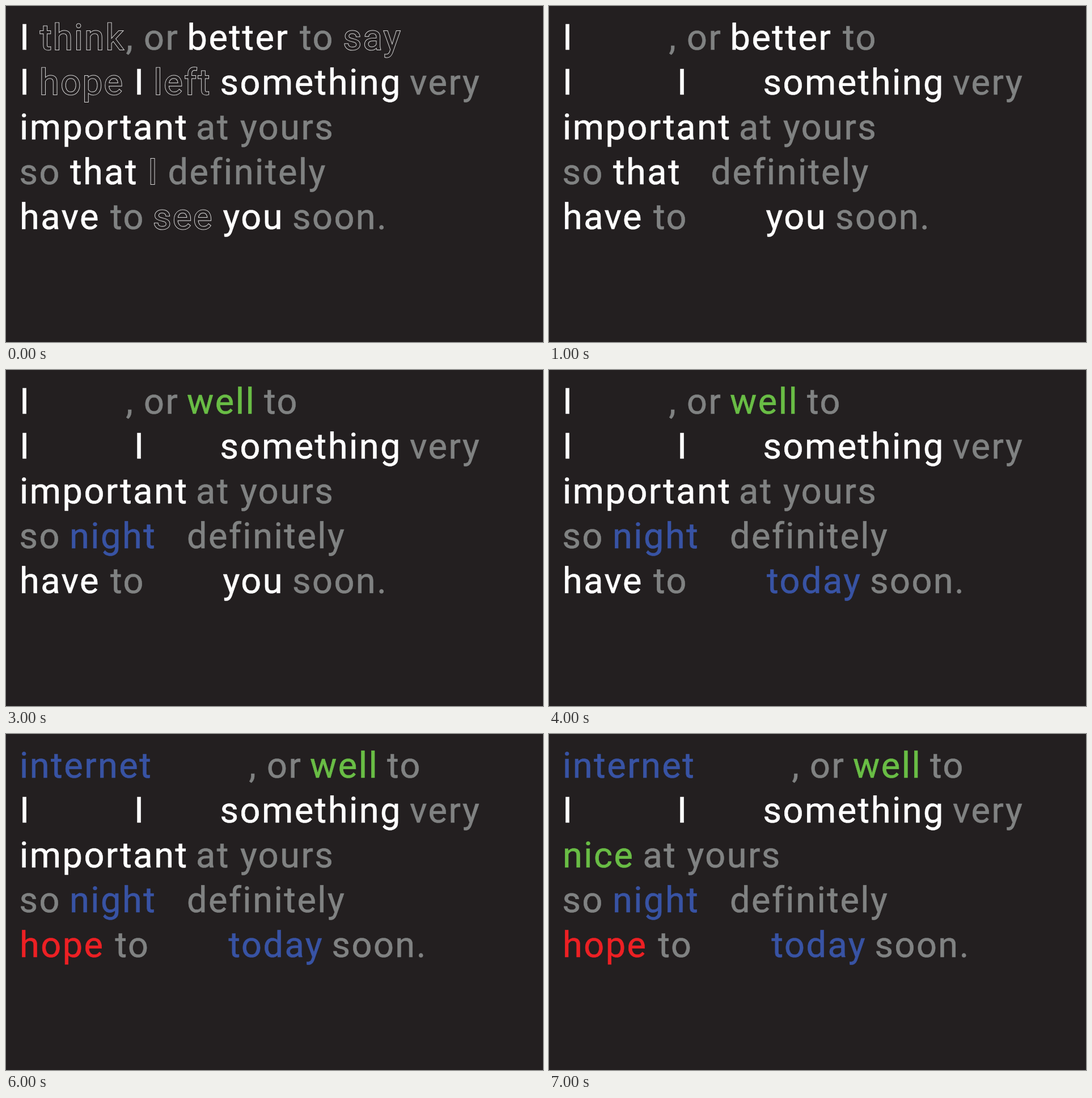
An HTML page that plays this animation: 947 by 592 pixels, repeating every 8 s.

```html
<!DOCTYPE html>
<html lang="en">
<head>
<meta charset="utf-8">
<title>Letter</title>
<style>
  html, body { margin: 0; width: 100%; height: 100%; overflow: hidden; background: #231f20; }
  svg { display: block; width: 947px; height: 592px; }
  text {
    font: 400 63px Roboto, "Liberation Sans", sans-serif;
    letter-spacing: 2.5px;
    fill: var(--ink);
    stroke: var(--ink);
    stroke-width: .6px;
  }
  .white { --ink: #fff; }
  .gray { --ink: #808282; }
  .green { --ink: #69bd45; }
  .blue { --ink: #3853a4; }
  .red { --ink: #ed2024; }
  .outline { fill: #231f20; stroke: #d8d8d8; stroke-width: 2px; paint-order: stroke; }
</style>
</head>
<body>
<svg viewBox="0 0 947 592"></svg>
<script>
const LOOP = 8000, FIRST = 77, PITCH = 79;

// One list per line: [x, text, style, first second, last second, ...[second, shift]]
const lines = [
  [
    [24, 'I', 'white', 0, 6],
    [24, 'internet', 'blue', 6, 8],
    [60, 'think', 'outline', 0, 1],
    [211.5, ',', 'gray', 0, 8, [6, 217]],
    [243, 'or', 'gray', 0, 8, [6, 217]],
    [319.5, 'better', 'white', 0, 2],
    [319, 'well', 'green', 2, 8, [6, 217]],
    [518, 'to', 'gray', 0, 8, [2, -63], [6, 217]],
    [594.5, 'say', 'outline', 0, 1]
  ],
  [
    [24, 'I', 'white', 0, 8],
    [59, 'hope', 'outline', 0, 1],
    [226, 'I', 'white', 0, 8],
    [260.5, 'left', 'outline', 0, 1],
    [377.5, 'something', 'white', 0, 8],
    [712, 'very', 'gray', 0, 8]
  ],
  [
    [24, 'important', 'white', 0, 7],
    [24, 'nice', 'green', 7, 8],
    [335, 'at', 'gray', 0, 8, [7, -169.5]],
    [413, 'yours', 'gray', 0, 8, [7, -169.5]]
  ],
  [
    [23.5, 'so', 'gray', 0, 8],
    [113, 'that', 'white', 0, 3],
    [112, 'night', 'blue', 3, 8],
    [250, 'I', 'outline', 0, 1],
    [285.5, 'definitely', 'gray', 0, 8, [3, 33.5]]
  ],
  [
    [24, 'have', 'white', 0, 5],
    [24, 'hope', 'red', 5, 8],
    [184, 'to', 'gray', 0, 8, [5, 8.5]],
    [259, 'see', 'outline', 0, 1],
    [382.5, 'you', 'white', 0, 4],
    [384, 'today', 'blue', 4, 8, [5, 8.5]],
    [505, 'soon.', 'gray', 0, 8, [4, 61], [5, 8.5]]
  ]
];

const svg = document.querySelector('svg');

function addWord([x, text, style, from, to, ...shifts], row) {
  const node = document.createElementNS('http://www.w3.org/2000/svg', 'text');
  node.textContent = text;
  node.setAttribute('class', style);
  node.setAttribute('y', FIRST + row * PITCH);
  svg.append(node);
  return { node, x, from, to, shifts };
}

const words = lines.flatMap((line, row) => line.map(word => addWord(word, row)));

function draw() {
  const second = (performance.now() % LOOP) / 1000;
  for (const { node, x, from, to, shifts } of words) {
    const dx = shifts.reduce((sum, [at, by]) => sum + (second >= at ? by : 0), 0);
    node.setAttribute('x', x + dx);
    node.setAttribute('visibility', second >= from && second < to ? 'visible' : 'hidden');
  }
  requestAnimationFrame(draw);
}

draw();
</script>
</body>
</html>
```
